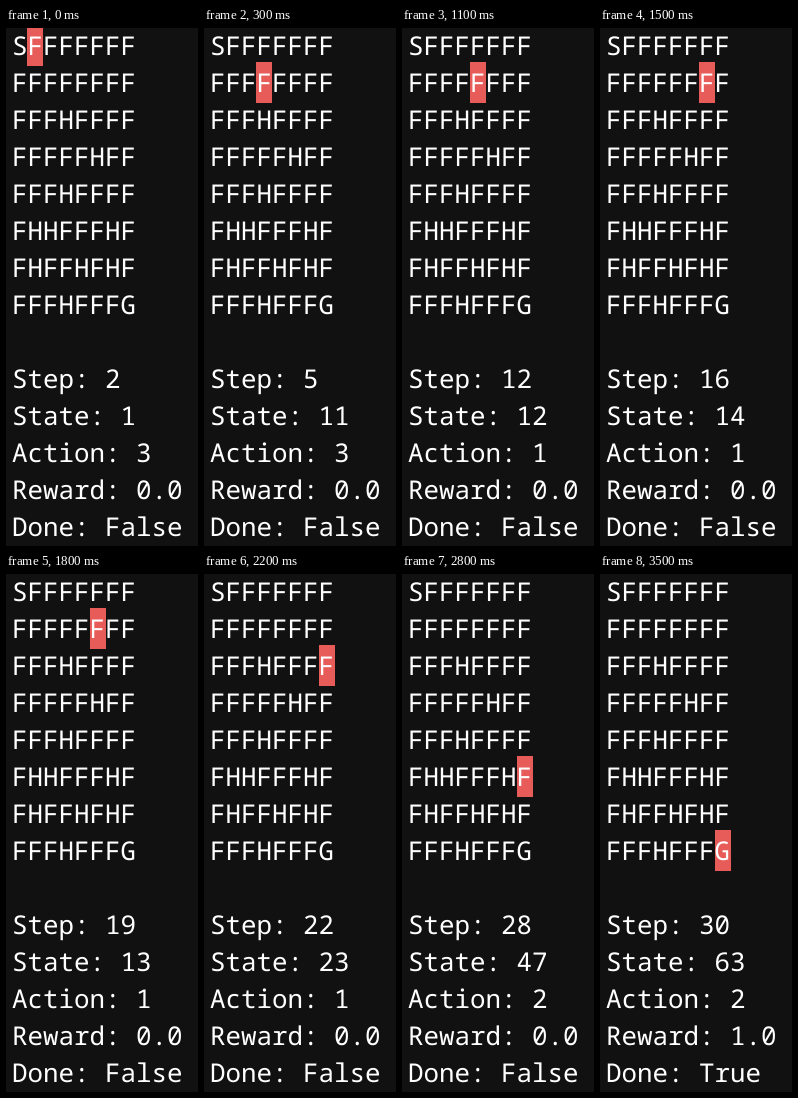
An HTML page that plays this animation: 192x518 px, repeating every 3600 ms.

```html
<!DOCTYPE html>
<html lang="en">
<head>
<meta charset="utf-8">
<title>Grid walk</title>
<style>
  html, body { margin: 0; width: 100%; height: 100%; overflow: hidden; background: #111; }
  svg { display: block; width: 192px; height: 518px; }
  text {
    font: 25.87px "Noto Sans Mono", "DejaVu Sans Mono", monospace;
    fill: #fff;
    text-rendering: geometricPrecision;
    white-space: pre;
  }
</style>
</head>
<body>
<svg viewBox="0 0 192 518"><rect id="agent" width="16" height="41" fill="#e75c58"/></svg>
<script>
const LOOP = 3600, TICK = 100, FIRST_STEP = 2;
const LEFT = 5.9, CHAR = 15.52, LINE = 37, BASELINE = 27;
const MAP = ["SFFFFFFF", "FFFFFFFF", "FFFHFFFF", "FFFFFHFF",
             "FFFHFFFF", "FHHFFFHF", "FHFFHFHF", "FFFHFFFG"];
const GOAL = 63;

// One entry per step: the cell reached and the action that led there
const states = [1, 2, 10, 11, 12, 4, 12, 4, 5, 13, 12, 13, 14, 15, 14,
                13, 12, 13, 14, 22, 23, 23, 23, 31, 31, 39, 47, 55, 63];
const actions = "32233323221311111131121112222";
// Ticks during which the walk pauses
const pauses = [5, 20];

const svg = document.querySelector("svg");
const agent = document.getElementById("agent");

function addLine(row, content) {
  const line = document.createElementNS(svg.namespaceURI, "text");
  line.setAttribute("x", LEFT);
  line.setAttribute("y", row * LINE + BASELINE);
  line.textContent = content;
  svg.append(line);
  return line;
}

MAP.forEach((cells, row) => addLine(row, cells));
const info = [9, 10, 11, 12, 13].map(row => addLine(row, ""));

function draw() {
  const tick = Math.floor(performance.now() % LOOP / TICK);
  const paused = pauses.filter(p => p <= tick).length;
  const i = Math.min(tick - paused, states.length - 1);
  const state = states[i], done = state === GOAL;

  agent.setAttribute("x", Math.round(LEFT + state % 8 * CHAR));
  agent.setAttribute("y", Math.floor(state / 8) * LINE - 3);
  [
    `Step: ${i + FIRST_STEP}`,
    `State: ${state}`,
    `Action: ${actions[i]}`,
    `Reward: ${done ? "1.0" : "0.0"}`,
    `Done: ${done ? "True" : "False"}`
  ].forEach((content, n) => {
    if (info[n].textContent !== content) info[n].textContent = content;
  });
  requestAnimationFrame(draw);
}
draw();
</script>
</body>
</html>
```
